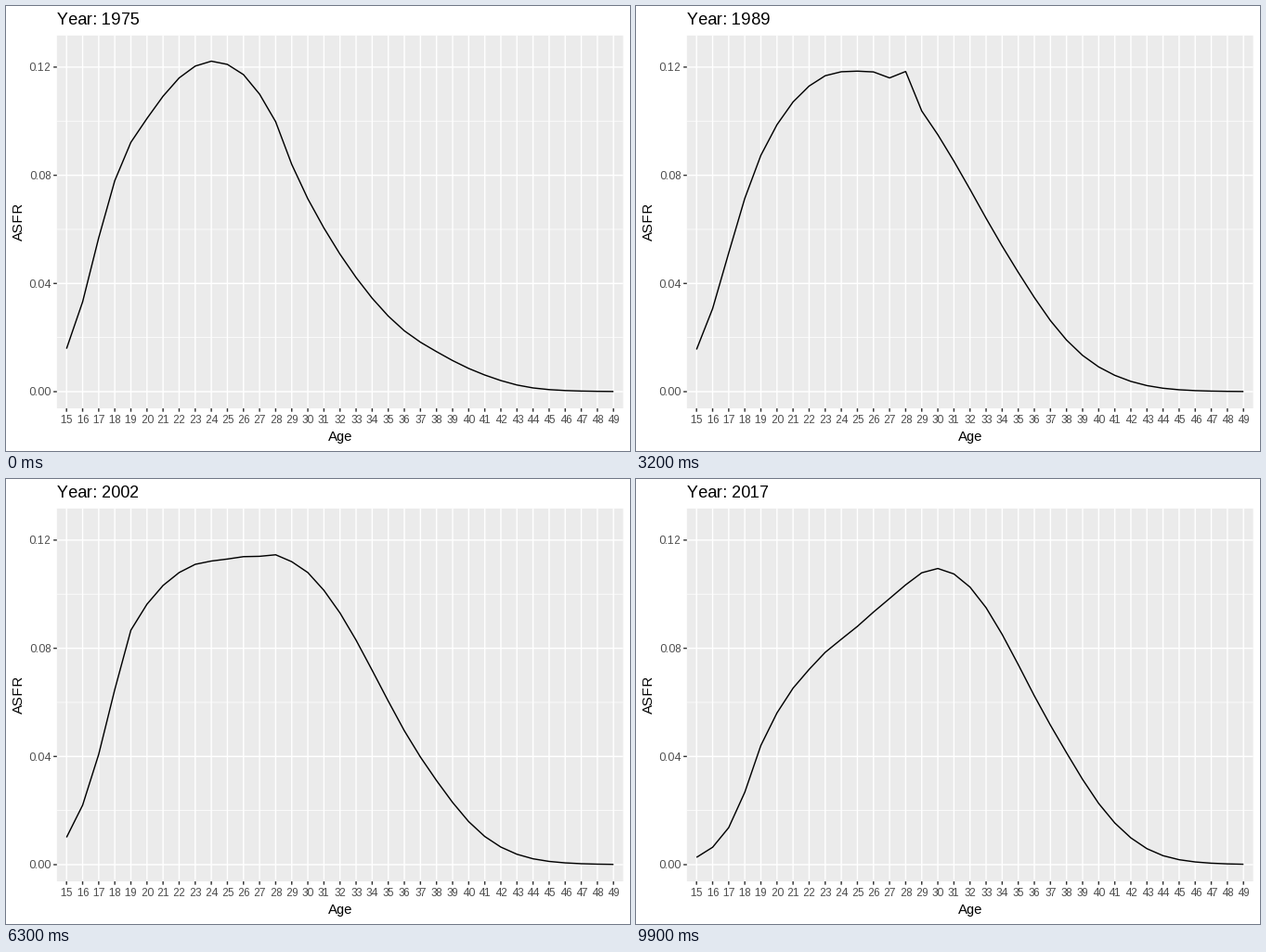
A matplotlib script for the animation above (10000 ms loop, 672 by 480 pixels).

```python
import matplotlib.pyplot as plt
import numpy as np
from matplotlib.animation import FuncAnimation
from matplotlib.patches import Rectangle

W, H, DPI = 672, 480, 96
FRAMES, INTERVAL = 100, 100
FIRST, LAST = 1975, 2017
SPAN = LAST - FIRST

LEFT, TOP, RIGHT, BOTTOM = 54.8, 31.9, 664.6, 434.0
ZERO, STEP = 416.0, 116.7            # y of rate 0, pixels per 0.04
THICK, THIN = 1.07, 0.53             # line widths in points

# Whole-pixel letter spacing without kerning
plt.rcParams.update({
    "font.family": "Liberation Sans",
    "path.snap": False,
    "text.hinting_factor": 1,
    "text.kerning_factor": 6,
})

AGES = np.arange(15, 50)
X = LEFT + (AGES - 14.4) * (RIGHT - LEFT) / 35.2

# Births per 1000 women at a few key ages and years
KEY_AGES = [15, 17, 19, 20, 22, 25, 27, 30, 33, 36, 39, 42]
KEY_RATES = {
    1975: [15.9, 56.9, 92.2, 101, 116, 121, 110, 71.3, 42.2, 22.5, 11.5, 4.1],
    1988: [15.6, 51.3, 87.4, 98.7, 113, 118.5, 116, 95, 64.1, 34.8, 13.4, 3.8],
    1996: [15.1, 53.1, 93.3, 101.5, 111, 107.5, 109, 99.3, 73.4, 43, 18.9, 5.5],
    2001: [10.1, 40.8, 86.7, 96.3, 108, 113, 114, 108, 83, 49.5, 23, 6.5],
    2011: [5.8, 26.1, 64.5, 75.1, 86.6, 99.9, 108, 109, 89.5, 57.3, 27.8, 8.6],
    2017: [2.7, 13.7, 44.1, 56.1, 72.2, 88.1, 98.4, 109.5, 95, 62.4, 31.5, 9.9],
}


def smooth(x, knots, values):
    """Cubic Hermite curve through the rows of values."""
    knots = np.asarray(knots, float)
    slopes = np.gradient(values, knots, axis=0, edge_order=2)
    i = np.clip(np.searchsorted(knots, x, side="right") - 1, 0, len(knots) - 2)
    h = (knots[i + 1] - knots[i])[:, None]
    t = (x - knots[i])[:, None] / h
    return ((1 + 2 * t) * (1 - t) ** 2 * values[i]
            + t * (1 - t) ** 2 * h * slopes[i]
            + t * t * (3 - 2 * t) * values[i + 1]
            + t * t * (t - 1) * h * slopes[i + 1])


def make_curves():
    years = np.arange(FIRST, LAST + 1)
    keys = np.array(list(KEY_RATES.values()))
    # Rates past 42 fall off in a fixed proportion
    keys = np.hstack([keys, keys[:, -1:] * [0.185, 0.015]])
    logs = smooth(years, list(KEY_RATES), np.log(keys))
    rates = np.exp(smooth(AGES, KEY_AGES + [45, 49], logs.T)).T
    # A passing surplus at age 28
    rates[:, 28 - AGES[0]] += 7.5 * np.exp(-((years - 1987) / 10) ** 2)
    return ZERO - rates * STEP / 40


# Each year's curve holds until the next one starts; the title rounds on its own
STARTS = np.round(np.arange(SPAN + 1) * (FRAMES - 1) / SPAN + 1) - 1
CURVES = make_curves()

fig = plt.figure(figsize=(W / DPI, H / DPI), dpi=DPI, facecolor="white")
ax = fig.add_axes([0, 0, 1, 1])
ax.set_xlim(0, W)
ax.set_ylim(H, 0)
ax.axis("off")


def segment(xs, ys, color, lw=THICK):
    ax.plot(xs, ys, color=color, lw=lw, solid_capstyle="butt")


def label(x, y, s, size, color="black", **kw):
    return ax.text(x, y, s, fontsize=size, color=color, va="baseline", **kw)


ax.add_patch(Rectangle((LEFT, TOP), RIGHT - LEFT, BOTTOM - TOP,
                       fc="#EBEBEB", ec="none", zorder=0))

for i in range(3):
    y = ZERO - (i + 0.5) * STEP
    segment([LEFT, RIGHT], [y, y], "white", THIN)

for i in range(4):
    y = ZERO - i * STEP
    segment([LEFT, RIGHT], [y, y], "white")
    segment([LEFT - 3.67, LEFT], [y, y], "#333333")
    label(48.2, y + 4.2, f"{i * 0.04:.2f}", 8.8, "#4D4D4D", ha="right")

for age, x in zip(AGES, X):
    segment([x, x], [TOP, BOTTOM], "white")
    segment([x, x], [BOTTOM, BOTTOM + 3.67], "#333333")
    label(x, 450.2, str(age), 8.8, "#4D4D4D", ha="center")

label((LEFT + RIGHT) / 2, 469, "Age", 11, ha="center")
label(18.2, (TOP + BOTTOM) / 2, "ASFR", 11, ha="center",
      rotation=90, rotation_mode="anchor")

title = label(LEFT, 20.2, "", 13.2, ha="left")
line, = ax.plot(X, CURVES[0], color="black", lw=THICK, zorder=3,
                solid_capstyle="butt", solid_joinstyle="round")


def update(i):
    k = np.searchsorted(STARTS, i, side="right") - 1
    line.set_ydata(CURVES[k])
    title.set_text(f"Year: {round(FIRST + SPAN * i / (FRAMES - 1))}")
    return line, title


anim = FuncAnimation(fig, update, frames=FRAMES, interval=INTERVAL,
                     repeat=True, repeat_delay=0)
plt.show()
```
